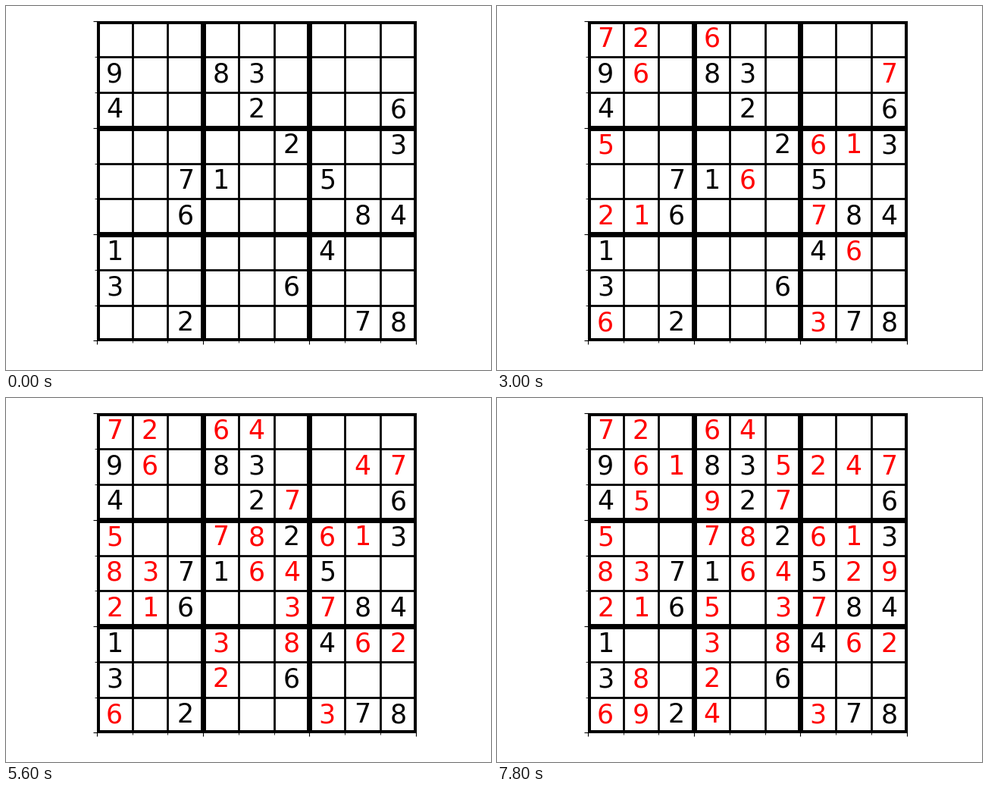
A matplotlib script that plays this animation: 640 px wide and 480 px high, repeating every 8 s.

```python
from itertools import product

import matplotlib.pyplot as plt
from matplotlib.animation import FuncAnimation

W, H, DPI = 640, 480, 100
STEP_MS, STEPS = 200, 40
LEFT, TOP, SIZE = 119.77, 20.45, 421.02

PUZZLE = """
.........
9..83....
4...2...6
.....2..3
..71..5..
..6....84
1.....4..
3....6...
..2....78
""".split()

CELLS = list(product(range(9), range(9)))


def house_ids(cell):
    r, c = cell
    return {("row", r), ("col", c), ("box", r // 3, c // 3)}


UNITS = {}
for cell in CELLS:
    for house in house_ids(cell):
        UNITS.setdefault(house, []).append(cell)


def fix(cand, cell, digit):
    """Settle a cell and strike its digit from every cell it sees."""
    for house in house_ids(cell):
        for peer in UNITS[house]:
            cand[peer].discard(digit)
    cand[cell].clear()


def find_singles(cand):
    """Cells with one candidate left, or the only place for a digit."""
    found = {cell: min(ds) for cell, ds in cand.items() if len(ds) == 1}
    for unit in UNITS.values():
        for digit in range(1, 10):
            spots = [cell for cell in unit if digit in cand[cell]]
            if len(spots) == 1:
                found[spots[0]] = digit
    return found


def solve(givens, count):
    """First moves of a breadth-first propagation, in order of discovery."""
    cand = {cell: set(range(1, 10)) for cell in CELLS}
    for cell, digit in givens.items():
        fix(cand, cell, digit)
    moves, settled = {}, 0
    while True:
        found = find_singles(cand)
        for r, c in sorted(found, key=lambda rc: (rc[1] // 3, rc)):
            moves.setdefault((r, c), found[r, c])
        if len(moves) >= count:
            return list(moves.items())[:count]
        if settled == len(moves):
            # nothing forced: try the tightest cell, scanning by column
            guess = min((cell for cell in CELLS if cand[cell]),
                        key=lambda rc: (len(cand[rc]), rc[1], rc[0]))
            moves[guess] = min(cand[guess])
        cell, digit = list(moves.items())[settled]
        fix(cand, cell, digit)
        settled += 1


fig = plt.figure(figsize=(W / DPI, H / DPI), dpi=DPI, facecolor="white")
ax = fig.add_axes([LEFT / W, 1 - (TOP + SIZE) / H, SIZE / W, SIZE / H])
ax.set(xlim=(0, 9), ylim=(9, 0))

for axis in (ax.xaxis, ax.yaxis):
    axis.set_ticks(range(0, 10, 3))
    axis.set_ticks([i for i in range(10) if i % 3], minor=True)
ax.tick_params(which="both", labelbottom=False, labelleft=False)
ax.grid(which="minor", color="black", linewidth=2)
ax.grid(which="major", color="black", linewidth=5)


def put_digit(cell, digit, color):
    r, c = cell
    return ax.text(c + 0.5, r + 0.5, str(digit), color=color, fontsize=25,
                   family="DejaVu Sans", ha="center", va="center")


givens = {(r, c): int(PUZZLE[r][c]) for r, c in CELLS if PUZZLE[r][c] != "."}
for cell, digit in givens.items():
    put_digit(cell, digit, "black")
answers = [put_digit(cell, digit, "red")
           for cell, digit in solve(givens, STEPS - 1)]


def update(frame):
    for i, text in enumerate(answers):
        text.set_visible(i < frame)
    return answers


anim = FuncAnimation(fig, update, frames=STEPS, interval=STEP_MS,
                     init_func=lambda: update(0), repeat=True, repeat_delay=0)
plt.show()
```
